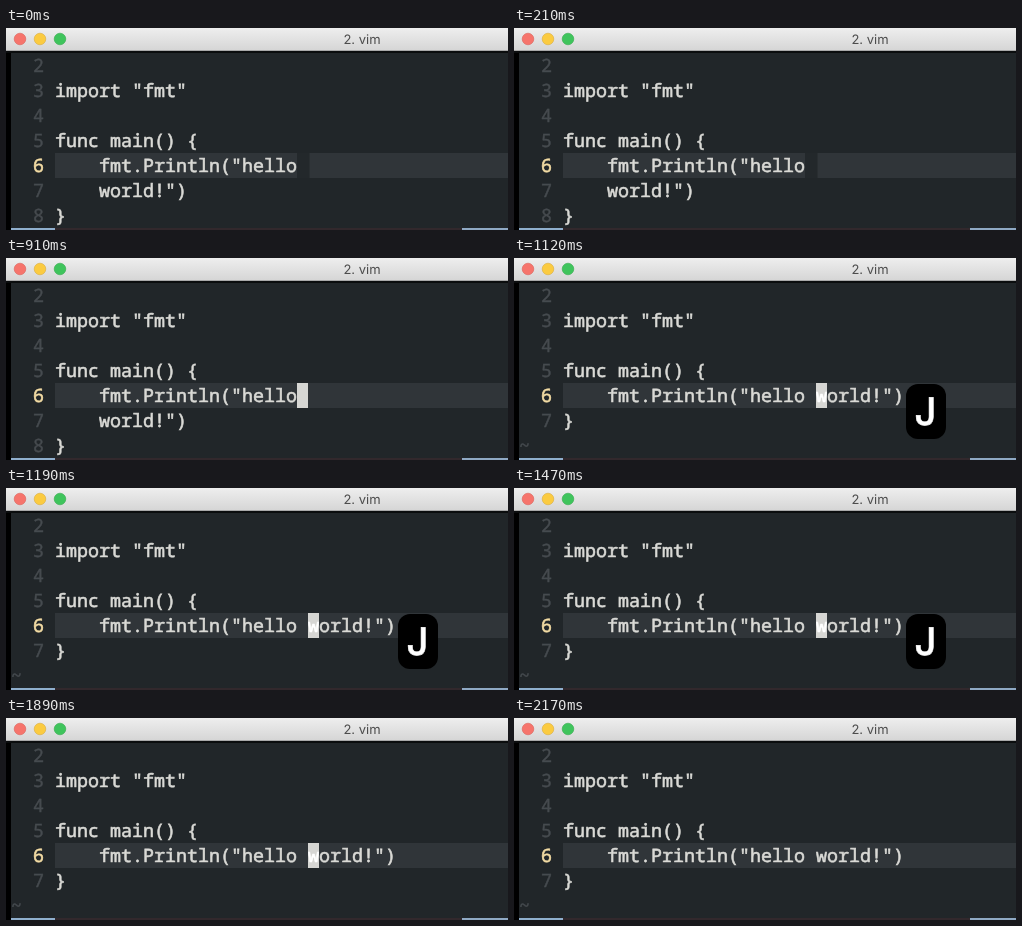
An HTML page that plays this animation: 502x202 px, repeating every 2310 ms.

```html
<!DOCTYPE html>
<html lang="en">
<head>
<meta charset="utf-8">
<title>Joining lines in vim</title>
<style>
html, body { margin: 0; width: 100%; height: 100%; overflow: hidden; background: #212629; }
svg { display: block; }
text { white-space: pre; text-rendering: geometricPrecision; }
.code { font: 18.333px "Noto Sans Mono", "DejaVu Sans Mono", monospace; fill: #dadad6; stroke: #dadad6; stroke-width: .6; }
.code .num { fill: #464b4f; stroke: #464b4f; stroke-width: .4; }
.code .current { fill: #f3dca4; stroke: #f3dca4; }
#under { fill: #fff; stroke: #fff; }
.title { font: 13px Inter, "Open Sans", sans-serif; fill: #4c4c4c; text-anchor: middle; }
.key { font: 500 38px Inter, "Open Sans", sans-serif; fill: #fff; stroke: #fff; stroke-width: .6; text-anchor: middle; }
</style>
</head>
<body>
<svg width="502" height="202" viewBox="0 0 502 202">
  <defs>
    <linearGradient id="bar" x2="0" y2="1">
      <stop stop-color="#eeeeee"/><stop offset="1" stop-color="#d6d6d6"/>
    </linearGradient>
  </defs>
  <rect width="502" height="202" fill="#212629"/>
  <rect y="22" width="5" height="180"/>
  <rect y="22" width="502" height="3" fill="#0b0d0e"/>
  <rect width="502" height="22" fill="url(#bar)"/>
  <rect y="22" width="502" height="1" fill="#a9a9a9"/>
  <g stroke-width=".6">
    <circle cx="14" cy="11" r="5.8" fill="#f6746c" stroke="#dc6058"/>
    <circle cx="34" cy="11" r="5.8" fill="#fbcb40" stroke="#dcae3a"/>
    <circle cx="54" cy="11" r="5.8" fill="#3fc45c" stroke="#35a94c"/>
  </g>
  <text class="title" x="356" y="16">2. vim</text>

  <rect x="49" y="125" width="453" height="25" fill="#303539"/>
  <rect id="cursor" y="125" height="25"/>
  <g class="code" id="split"></g>
  <g class="code" id="joined"></g>
  <text class="code" id="under" x="302" y="144">w</text>

  <rect x="5" y="200" width="44" height="2" fill="#8fafcd"/>
  <rect x="49" y="200" width="407" height="2" fill="#32282c"/>
  <rect x="456" y="200" width="46" height="2" fill="#8fa9c4"/>

  <g id="key">
    <rect x="392" y="126" width="40" height="55" rx="12"/>
    <text class="key" x="411.5" y="167">J</text>
  </g>
</svg>
<script>
const LOOP = 2310, CELL = 11, ROW = 25;
const CURSOR_ON = 910, JOIN = 1050, FADE = 1540, FADE_TIME = 180, CURSOR_OFF = 2170;
const el = id => document.getElementById(id);
const show = (id, on) => { el(id).style.display = on ? "" : "none"; };

const head = ["", 'import "fmt"', "", "func main() {"];
const text = (x, y, cls, s) => `<text x="${x}" y="${y}" class="${cls}">${s}</text>`;

// Buffer lines start at line number 2, directly below the title bar.
function render(lines) {
  return lines.map((line, i) => {
    const n = i + 2, y = ROW * (n - 1) + 19;
    return text(5 + 2 * CELL, y, n === 6 ? "current" : "num", n) + text(49, y, "", line);
  }).join("");
}

el("split").innerHTML = render([...head, '    fmt.Println("hello', '    world!")', "}"]);
el("joined").innerHTML = render([...head, '    fmt.Println("hello world!")', "}"]) +
  text(5, 194, "num", "~");

function draw(t) {
  const joined = t >= JOIN;
  const lit = t >= CURSOR_ON && t < CURSOR_OFF;
  show("split", !joined);
  show("joined", joined);
  show("under", joined && lit);
  show("cursor", lit || !joined);
  el("cursor").setAttribute("x", joined ? 302 : 291);
  el("cursor").setAttribute("width", lit ? CELL : CELL + 1.5);
  el("cursor").setAttribute("fill", lit ? "#d6d6d3" : "#23282b");
  const fade = Math.min(1, Math.max(0, (t - FADE) / FADE_TIME));
  el("key").setAttribute("opacity", joined ? 1 - fade : 0);
}

const start = performance.now();
function tick() {
  draw((performance.now() - start) % LOOP);
  requestAnimationFrame(tick);
}
tick();
</script>
</body>
</html>
```
